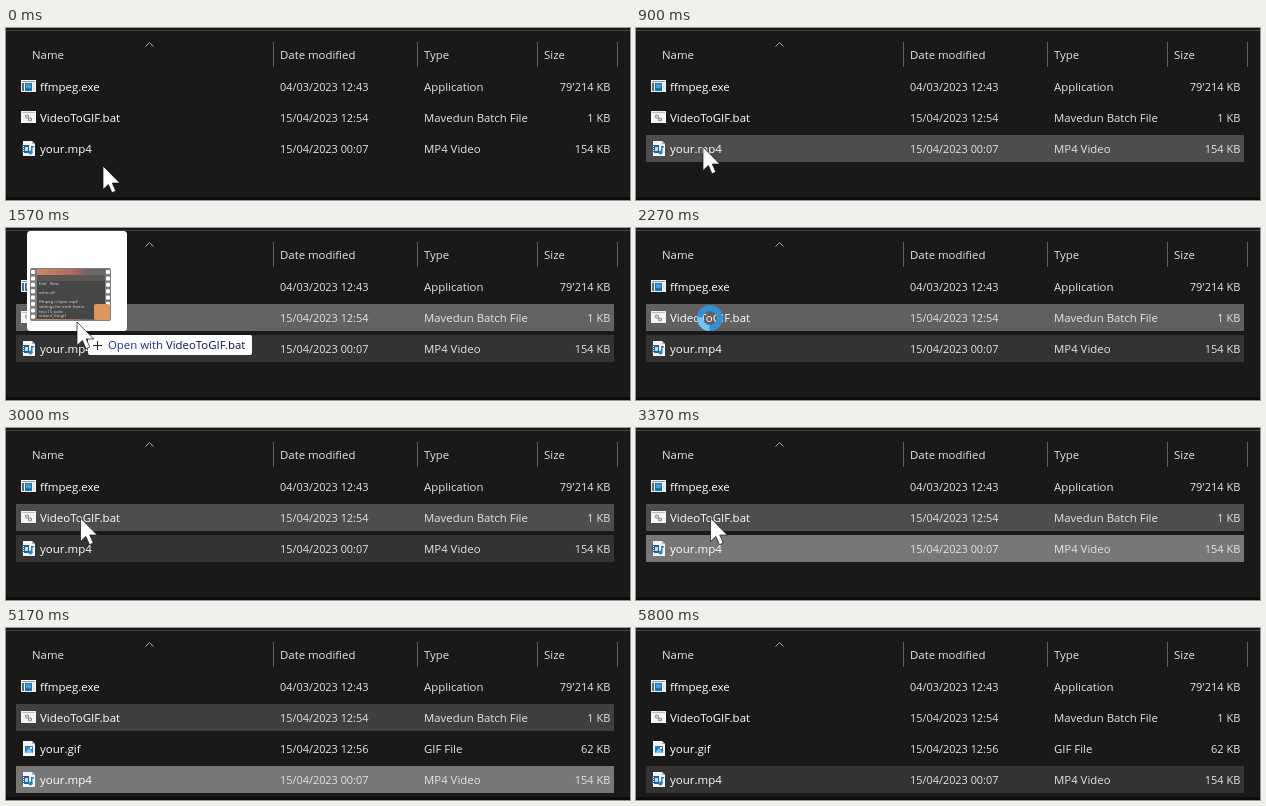
Recreate the animation shown at these times as an HTML page with a canvas. Size 624 px wide and 172 px high, loop 5830 ms.

```html
<!DOCTYPE html>
<html lang="en">
<head>
<meta charset="utf-8">
<title>File list</title>
<style>
html, body { margin: 0; width: 100%; height: 100%; overflow: hidden; background: #191919; }
canvas { display: block; width: 624px; height: 172px; }
</style>
</head>
<body>
<canvas id="stage" width="624" height="172"></canvas>
<script>
const ctx = document.getElementById('stage').getContext('2d');
const LOOP = 5830;
const FONT = '"Open Sans", "Noto Sans", sans-serif';
const TEXT = '#e4e4e4';
const BACK = 0x19, HOVER = 0x4d, DROP = 0x62, SELECTED = 0x77, IDLE = 0x33;

// Each track is a list of [time, value] with linear motion in between.
const batTone = [[1440, BACK], [1530, DROP], [2260, DROP], [2370, HOVER], [5150, HOVER], [5230, BACK]];
const videoTone = [[745, BACK], [870, HOVER], [1050, HOVER], [1130, SELECTED], [1230, SELECTED],
  [1300, IDLE], [3240, IDLE], [3370, SELECTED], [5799, SELECTED], [5800, IDLE]];
const videoY = [[4040, 121], [4170, 152]];
const gifAlpha = [[4050, 0], [4170, 1]];
const pointerX = [[710, 97], [900, 67], [1050, 67], [1370, 66], [1570, 71], [1870, 74.5]];
const pointerY = [[710, 138], [900, 119], [1050, 119], [1370, 112.6], [1570, 94], [1870, 90]];
const dragAlpha = [[1220, 0], [1320, 1]];

function at(track, t) {
  if (t <= track[0][0]) return track[0][1];
  for (let i = 1; i < track.length; i++) {
    const [t0, a] = track[i - 1], [t1, b] = track[i];
    if (t < t1) return a + (b - a) * (t - t0) / (t1 - t0);
  }
  return track[track.length - 1][1];
}

function box(x, y, w, h, color) {
  ctx.fillStyle = color;
  ctx.fillRect(x, y, w, h);
}

function rounded(x, y, w, h, r, color) {
  ctx.fillStyle = color;
  ctx.beginPath();
  ctx.roundRect(x, y, w, h, r);
  ctx.fill();
}

function shape(points, color) {
  ctx.fillStyle = color;
  ctx.beginPath();
  points.forEach(([x, y]) => ctx.lineTo(x, y));
  ctx.closePath();
  ctx.fill();
}

function label(text, x, y, color = TEXT, size = 11.4, align = 'left') {
  ctx.font = `${size}px ${FONT}`;
  ctx.textAlign = align;
  ctx.fillStyle = color;
  ctx.fillText(text, x, y);
}

function page() {
  shape([[2, 1], [11, 1], [14, 4], [14, 16], [2, 16]], '#f4f4f4');
  shape([[11, 1], [14, 4], [11, 4]], '#b8b8b8');
}

const icons = {
  exe() {
    box(0, 2, 15, 12, '#f4f4f4');
    box(1, 3, 13, 1, '#8d9aa2');
    box(1, 5, 2, 8, '#56666f');
    box(4, 5, 7, 8, '#1d6fae');
    box(5, 6, 5, 4, '#3aa0dc');
    box(12, 5, 2, 8, '#dfe5e8');
  },
  bat() {
    box(0, 2, 15, 12, '#f4f4f4');
    box(1, 3, 13, 1, '#b5bbbf');
    ctx.strokeStyle = '#848c92';
    ctx.lineWidth = 1.2;
    for (const [x, y] of [[6, 7.5], [9, 10.5]]) {
      ctx.beginPath();
      ctx.arc(x, y, 1.5, 0, 7);
      ctx.stroke();
    }
  },
  gif() {
    page();
    box(4, 6, 8, 7, '#2878c8');
    shape([[4, 13], [8, 8], [12, 13]], '#84c3ee');
    box(9, 7, 2, 2, '#fff');
  },
  video() {
    page();
    box(1, 5, 7, 8, '#2d5f8c');
    for (let y = 6; y < 13; y += 2) box(2, y, 1, 1, '#fff');
    box(4, 7, 3, 4, '#b5dcf3');
    box(10, 6, 1.5, 7, '#2384cc');
    box(10, 6, 3, 1.5, '#2384cc');
    ctx.beginPath();
    ctx.arc(9.5, 12.5, 2, 0, 7);
    ctx.fill();
  }
};

function row(y, icon, name, date, type, size, tone = BACK) {
  const g = Math.round(tone);
  if (g > BACK) box(10, y - 14, 598, 27, `rgb(${g},${g},${g})`);
  ctx.save();
  ctx.translate(15, y - 9);
  icons[icon]();
  ctx.restore();
  label(name, 34, y + 4, '#fff', 11.5);
  label(date, 274, y + 4, TEXT, 10.9);
  label(type, 418, y + 4);
  label(size, 604.3, y + 4, TEXT, 11, 'right');
}

function chrome() {
  box(0, 0, 624, 172, '#191919');
  box(0, 2, 624, 1, '#444');
  box(0, 169, 624, 3, '#100a0e');
  for (const x of [267, 411, 531, 611]) box(x, 14, 1, 25, '#606060');
  label('Name', 26, 31);
  label('Date modified', 274, 31);
  label('Type', 418, 31);
  label('Size', 538, 31);
  ctx.strokeStyle = '#aaa';
  ctx.lineWidth = 1;
  ctx.beginPath();
  ctx.moveTo(139.5, 18.5);
  ctx.lineTo(143.5, 14.5);
  ctx.lineTo(147.5, 18.5);
  ctx.stroke();
}

function preview() {
  rounded(3, 37, 81, 53, 2, '#7d7d7d');
  for (let y = 39; y < 88; y += 6.4) {
    rounded(4, y, 4, 4, 1, '#fff');
    rounded(79, y, 4, 4, 1, '#fff');
  }
  const sky = ctx.createLinearGradient(10, 0, 78, 0);
  sky.addColorStop(0, '#c98a66');
  sky.addColorStop(0.5, '#b5695c');
  sky.addColorStop(0.75, '#6e6468');
  sky.addColorStop(1, '#66686e');
  box(10, 38, 68, 51, sky);
  box(10, 44, 68, 44, '#464646');
  box(10, 44, 68, 6, '#5a5654');
  ['Edit   View', '', 'echo off', '', 'ffmpeg -i input.mp4', 'settings for each frame', 'fps=15,scale', 'output_file.gif']
    .forEach((line, i) => label(line, 12, 54 + i * 4.6, '#ddd', 4.2));
  rounded(67, 73, 16, 16, 2, '#dc965f');
}

function dragImage(x, y, t) {
  ctx.save();
  ctx.globalAlpha = at(dragAlpha, t);
  ctx.translate(Math.round(x - 50), Math.round(y - 91));
  rounded(0, 0, 100, 100, 3.5, '#fff');
  if (t >= 1430) preview();
  ctx.restore();
}

function dropHint(x, y) {
  ctx.save();
  ctx.translate(Math.round(x + 11), Math.round(y + 13));
  rounded(0, 0, 164, 20, 2, '#fff');
  box(5, 10, 9, 1, '#222');
  box(9, 6, 1, 9, '#222');
  label('Open with ', 20, 14, '#1a2f96');
  label('VideoToGIF.bat', 20 + ctx.measureText('Open with ').width, 14, '#0c1058');
  ctx.restore();
}

function arrow(x, y) {
  ctx.save();
  ctx.translate(x, y);
  ctx.scale(1.42, 1.42);
  shape([[0, 0], [0, 16.5], [3.8, 13], [6.3, 18.8], [9, 17.6], [6.5, 12], [11.8, 12]], '#fff');
  ctx.strokeStyle = '#111';
  ctx.lineWidth = 0.5;
  ctx.stroke();
  ctx.restore();
}

function busyRing(x, y, t) {
  const turn = t / 160;
  ctx.lineWidth = 6;
  ctx.strokeStyle = '#3591d6';
  ctx.beginPath();
  ctx.arc(x, y, 10, 0, 7);
  ctx.stroke();
  ctx.strokeStyle = '#76c4f4';
  ctx.beginPath();
  ctx.arc(x, y, 10, turn, turn + 1.6);
  ctx.stroke();
}

function pointer(t) {
  if (t >= 5170) return;
  const x = at(pointerX, t), y = at(pointerY, t);
  if (t >= 1220 && t < 2270) dragImage(x, y, t);
  if (t >= 1470 && t < 2270) dropHint(x, y);
  if (t >= 2270 && t < 2330) busyRing(74, 90, t);
  else arrow(x, y);
}

function draw(t) {
  chrome();
  row(59, 'exe', 'ffmpeg.exe', '04/03/2023 12:43', 'Application', '79\'214 KB');
  row(90, 'bat', 'VideoToGIF.bat', '15/04/2023 12:54', 'Mavedun Batch File', '1 KB', at(batTone, t));
  const fade = at(gifAlpha, t);
  if (fade > 0) {
    ctx.globalAlpha = fade;
    row(121, 'gif', 'your.gif', '15/04/2023 12:56', 'GIF File', '62 KB');
    ctx.globalAlpha = 1;
  }
  row(Math.round(at(videoY, t)), 'video', 'your.mp4', '15/04/2023 00:07', 'MP4 Video', '154 KB', at(videoTone, t));
  pointer(t);
}

const start = performance.now();
function tick() {
  draw((performance.now() - start) % LOOP);
  requestAnimationFrame(tick);
}
tick();
</script>
</body>
</html>
```
